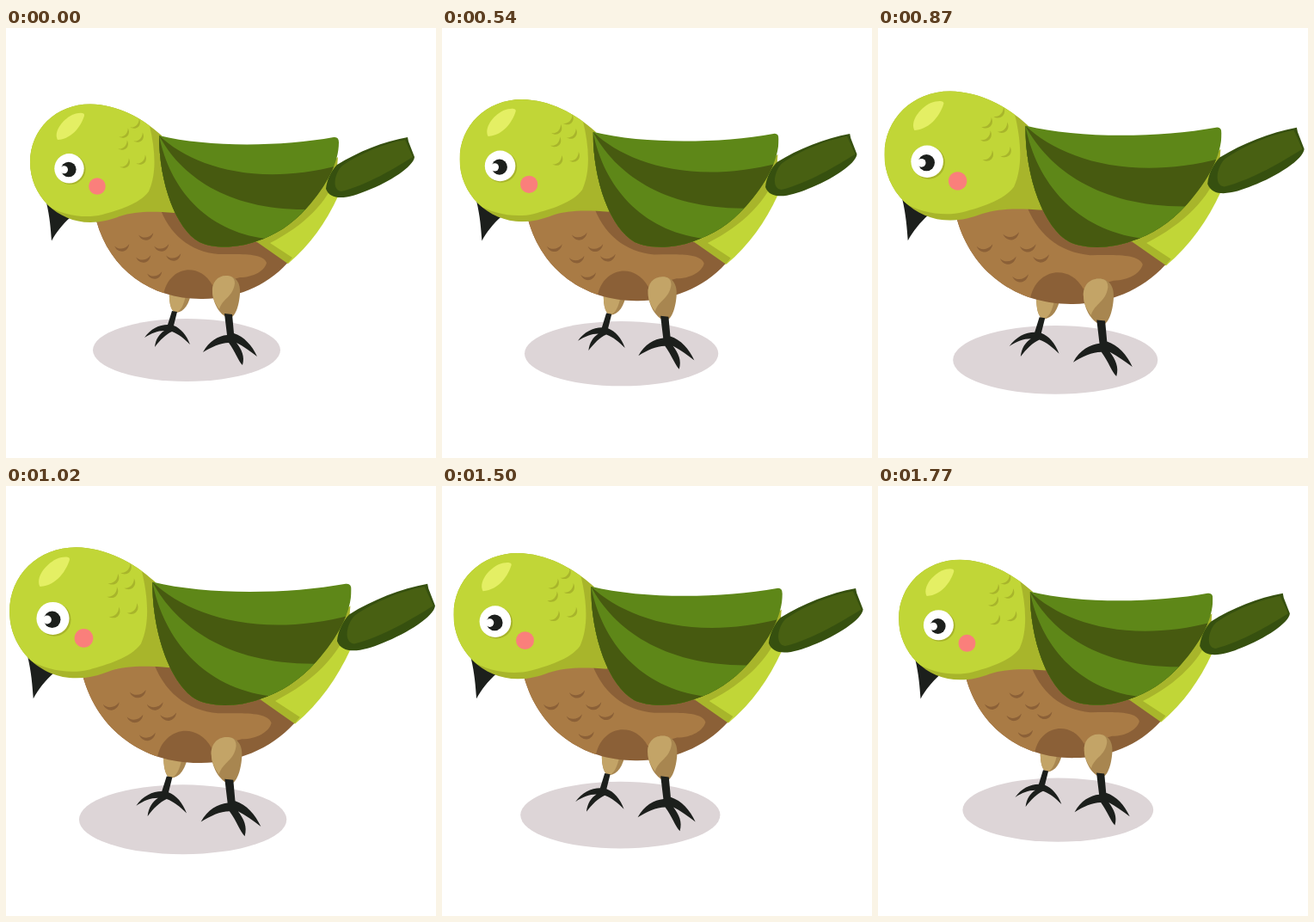
An HTML page that plays this animation: 500 px wide and 500 px high, repeating every 1.8 s.

```html
<!DOCTYPE html>
<html lang="en">
<head>
<meta charset="utf-8">
<title>Green bird</title>
<style>
  html, body { margin: 0; width: 100%; height: 100%; overflow: hidden; background: #fff; }
  svg { display: block; width: 100vw; height: 100vh; }
  .lime { fill: #c1d637; }
  .olive { fill: #a8b52b; }
  .brown { fill: #a97b45; }
  .umber { fill: #8b6037; }
  .tan { fill: #c3a467; }
  .tan-dark { fill: #a88650; }
  .bright { fill: #5e8718; }
  .moss { fill: #475a10; }
  .ink { fill: #1c1f1c; }
</style>
</head>
<body>
<svg viewBox="0 0 500 500">
  <defs>
    <path id="mark" d="M-9-2.500C-5 3 4 3 9-3C8 2 4 5 0 5C-4 5-8 2-9-2.500Z"/>
    <clipPath id="wing">
      <path d="M178 125C235 139 320 138 381 127Q387 126 387 133C387 157 373 183 350 209C332 229 313 241 291 248C270 256 242 257 225 249C198 234 178 181 178 125Z"/>
    </clipPath>
    <clipPath id="body">
      <path d="M105 224L190 205L292 249L327 273.500C302 301 266 315 229 315C170 316 121 282 105 224Z"/>
    </clipPath>
    <clipPath id="skull">
      <path d="M98 88.500C129 89 158 104 181 125L196 215C170 213 150 213 132 219C122 223 110 226 98 226C60 226 28 195 28 156C28 118 58 88.500 98 88.500Z"/>
    </clipPath>
  </defs>
  <g id="bird">
    <ellipse cx="210" cy="374.500" rx="109" ry="36.500" fill="#ddd5d7"/>

    <!-- far leg -->
    <path class="tan-dark" d="M190 305C189 322 193 331 198 331C207 330 213 322 216 305Z"/>
    <path class="tan" d="M190 305C189 322 193 331 198 331C205 328 208 318 210 305Z"/>
    <path class="ink" d="M193 329L199 330L195 346C203 349 210 357 214 368C207 361 201 356 193 353C186 356 179 363 173 371C174 362 178 356 184 352C176 352 169 355 161 360C168 350 178 345 188 345Z"/>

    <!-- rump -->
    <path class="lime" d="M280 240L385 155L386 196C372 226 354 252 328 274L285 249Z"/>
    <path class="olive" d="M285 240L386 150L384 172C375 201 347 230 307 250L333 267L327 274L286 250Z"/>

    <!-- tail -->
    <path fill="#36500f" d="M372 187C373 177 378 166 385 159C409 144 439 132 467 127L468 132L475 150C474 161 446 179 420 189C401 197 378 203 372 187Z"/>
    <path fill="#486012" d="M391 160C411 146 441 134 464 130L473 150C452 163 421 182 390 190C378 189 382 168 391 160Z"/>

    <!-- belly -->
    <g clip-path="url(#body)">
      <path class="umber" d="M90 190H340V330H90Z"/>
      <path class="brown" d="M90 200H176C187 239 213 260 247 263C271 263 299 261 303 273C301 282 288 290 272 290L240 299C229 279 208 277 195 288C187 295 184 302 181 320H90Z"/>
      <g id="belly" class="umber"></g>
    </g>

    <!-- near leg -->
    <path class="tan-dark" d="M256 288C268 288 273 297 272 309C271 324 266 338 259 337C250 335 241 322 240 307C239 296 246 288 256 288Z"/>
    <path class="tan" d="M256 288C262 288 266 290 266 297C264 313 252 314 248 327C243 320 240 314 240 307C239 296 246 288 256 288Z"/>
    <path class="ink" d="M254 332L263 333L265 355C277 359 286 369 292 382C284 376 276 370 268 366C274 374 278 382 275 392C270 387 267 377 259 366C249 366 239 371 229 377C236 364 247 358 257 357Z"/>

    <!-- head -->
    <path class="ink" d="M47 203C51 220 52 234 53 247.500C58 238 66 228 75 220Z"/>
    <g clip-path="url(#skull)">
      <path class="olive" d="M20 80H200V230H20Z"/>
      <path class="lime" d="M20 80H150L167 114C173 139 176 168 166 190C155 205 130 212 112 217C92 222 66 218 47 206L20 200Z"/>
    </g>
    <path fill="#e4ef64" d="M60 130C55 121 65 107 77 101C85 98 92 98 91 102C88 112 78 129 60 130Z"/>
    <g id="nape" class="olive"></g>
    <circle class="olive" cx="75" cy="164.500" r="17.500"/>
    <circle cx="73.500" cy="163.300" r="17.200" fill="#fff"/>
    <circle class="ink" cx="72.800" cy="164.500" r="8.800"/>
    <circle cx="67.500" cy="164.700" r="4.500" fill="#fff"/>
    <circle cx="106" cy="184" r="9.800" fill="#fa7f7b"/>

    <!-- wing: each layer covers the lower part of the one before -->
    <g clip-path="url(#wing)">
      <path class="bright" d="M170 110H400V270H170Z"/>
      <path class="moss" d="M178 125C215 160 290 186 390 159V270H170V125Z"/>
      <path class="bright" d="M178 125C203 172 258 212 350 211V270H170V125Z"/>
      <path class="moss" d="M178 125C190 186 232 236 302 245V270H170V125Z"/>
    </g>
  </g>
</svg>
<script>
  const bird = document.getElementById('bird');
  const LOOP = 1800, STEP = 30, HOLD = 240, LOW = 205, GROW = 0.1095;

  function addMarks(id, spots, turn, size) {
    document.getElementById(id).innerHTML = spots.map(([x, y]) =>
      `<use href="#mark" transform="translate(${x} ${y}) rotate(${turn}) scale(${size})"/>`).join('');
  }
  addMarks('belly', [[163, 242], [135, 255], [181, 255], [160, 268], [195, 266], [173, 287]], -6, 0.95);
  addMarks('nape', [[151, 112], [138, 123], [155, 128], [137, 137], [158, 154], [139, 158]], -42, 0.8);

  // Slow pulse: rest, swell to the peak, shrink, snap back to rest.
  function scaleAt(time) {
    const t = Math.floor((time % LOOP) / STEP) * STEP;
    if (t < HOLD) return 1;
    return 1 + GROW * (1 - Math.cos(2 * Math.PI * (t - LOW) / LOOP)) / 2;
  }

  const start = performance.now();
  function draw() {
    const s = scaleAt(performance.now() - start);
    bird.setAttribute('transform', `translate(251 250.500) scale(${s}) translate(-251 -250.500)`);
    requestAnimationFrame(draw);
  }
  draw();
</script>
</body>
</html>
```
